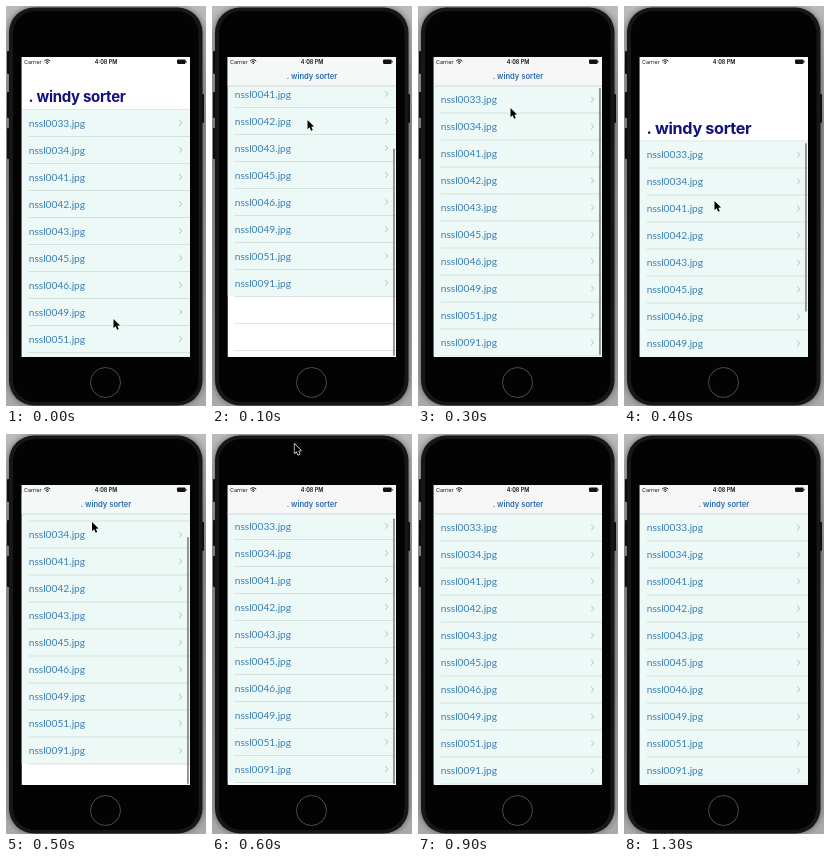
Write an HTML page with a canvas that moves like this. It is 200 by 400 pixels and loops after 1.4 s.

```html
<!DOCTYPE html>
<html lang="en">
<head>
<meta charset="utf-8">
<title>Phone list</title>
<style>
  html, body { margin: 0; width: 100%; height: 100%; overflow: hidden; background: #aaa; }
  canvas { display: block; width: 200px; height: 400px; }
</style>
</head>
<body>
<canvas id="stage"></canvas>
<script>
const canvas = document.getElementById('stage');
const ctx = canvas.getContext('2d');
const dpr = window.devicePixelRatio || 1;
canvas.width = 200 * dpr;
canvas.height = 400 * dpr;

const STEP = 100, STEPS = 14;
const SCREEN = { x: 15.5, y: 51, w: 168.5, h: 300 };
const BOTTOM = SCREEN.y + SCREEN.h;
const NAV = 80, LARGE = 103.5, ROW = 27;
const TITLE = '. windy sorter';
const FILES = [33, 34, 41, 42, 43, 45, 46, 49, 51, 91]
  .map(n => `nssl${String(n).padStart(4, '0')}.jpg`);

// list top, scroll bar opacity, pointer x and y
const POSES = [
  [103.5, 0, 107.5, 313],
  [20.5, 1, 95.5, 114],
  [58, 1, 93.5, 103],
  [80, 1, 92.5, 102],
  [135, 1, 90.5, 195],
  [60, 1, 86, 88],
  [78.5, 1, 82.5, 10],
  [79.6, 0.8],
  [80, 0.3]
];
const REST = [80, 0];

function box(x, y, w, h, r, fill) {
  ctx.beginPath();
  ctx.roundRect(x, y, w, h, r);
  ctx.fillStyle = fill;
  ctx.fill();
}

function line(x1, y1, x2, y2, color, width = 0.6) {
  ctx.beginPath();
  ctx.moveTo(x1, y1);
  ctx.lineTo(x2, y2);
  ctx.strokeStyle = color;
  ctx.lineWidth = width;
  ctx.stroke();
}

function text(str, x, y, font, color, align = 'left', spacing = 0) {
  ctx.font = font;
  ctx.fillStyle = color;
  ctx.textAlign = align;
  ctx.letterSpacing = spacing + 'px';
  ctx.fillText(str, x, y);
}

function drawPhone() {
  const bg = ctx.createLinearGradient(0, 0, 0, 400);
  bg.addColorStop(0, '#bcbcbc');
  bg.addColorStop(0.3, '#969696');
  bg.addColorStop(1, '#aaaaaa');
  ctx.fillStyle = bg;
  ctx.fillRect(0, 0, 200, 400);

  box(1, 45, 4, 23, 1, '#111');
  box(1, 86, 4, 26, 1, '#111');
  box(1, 122, 4, 31, 1, '#111');
  box(194, 88, 4, 29, 1, '#111');

  ctx.save();
  ctx.shadowColor = 'rgba(0,0,0,.5)';
  ctx.shadowBlur = 6 * dpr;
  box(3, 1.5, 193.5, 398, 25, '#171717');
  ctx.restore();
  box(7, 5, 185.5, 391, 22, '#030303');

  ctx.beginPath();
  ctx.arc(99.5, 376.5, 15, 0, Math.PI * 2);
  ctx.strokeStyle = '#4c4c4c';
  ctx.lineWidth = 1;
  ctx.stroke();
}

function drawRows(top) {
  const end = top + FILES.length * ROW;
  ctx.fillStyle = '#edf9f6';
  ctx.fillRect(SCREEN.x, top, SCREEN.w, end - top);

  FILES.forEach((name, i) => {
    const y = top + i * ROW + 13.5;
    text(name, 22.7, y + 3.5, '10.2px Lato, sans-serif', '#397fb6');
    ctx.beginPath();
    ctx.moveTo(173.2, y - 2.6);
    ctx.lineTo(175.9, y);
    ctx.lineTo(173.2, y + 2.6);
    ctx.strokeStyle = '#b2bdbb';
    ctx.lineWidth = 1;
    ctx.stroke();
  });

  for (let y = top + ROW; y < BOTTOM; y += ROW) {
    line(22.5, y, 184, y, y > end ? '#d3d3d3' : '#c6d2cf');
  }
}

function drawHeader(top) {
  const compact = top <= NAV;
  const bottom = Math.max(top, NAV);
  ctx.fillStyle = !compact ? '#fff' : top < 70 ? '#f4f8f7' : '#f6f6f6';
  ctx.fillRect(SCREEN.x, SCREEN.y, SCREEN.w, bottom - SCREEN.y);
  line(SCREEN.x, bottom, 184, bottom, compact ? '#bdc1c0' : '#ccd7d4');

  if (compact) {
    text(TITLE, 100, 72.8, '600 7.6px Inter, sans-serif', '#2a6db4', 'center');
  } else {
    const grow = 1 + Math.max(0, top - LARGE) * 0.0025;
    ctx.save();
    ctx.translate(22.5, top - 7.5);
    ctx.scale(grow, grow);
    text(TITLE, 0, 0, '700 15px Inter, sans-serif', '#11117c', 'left', -0.3);
    ctx.restore();
  }
}

function drawStatus() {
  text('Carrier', 18, 57.8, '5.4px Inter, sans-serif', '#111');
  text('4:08 PM', 100, 57.8, '600 5.5px Inter, sans-serif', '#111', 'center');

  ctx.strokeStyle = '#111';
  ctx.lineWidth = 1;
  for (const r of [2.3, 4.2]) {
    ctx.beginPath();
    ctx.arc(41.2, 58, r, -Math.PI * 0.76, -Math.PI * 0.24);
    ctx.stroke();
  }
  box(40.5, 56.7, 1.4, 1.4, 0.7, '#111');

  box(171, 53.5, 8.7, 4.4, 1.1, '#111');
  box(180.1, 55, 0.7, 1.5, 0.3, '#111');
}

function drawScrollBar(top, alpha) {
  if (!alpha) return;
  const head = Math.max(top, NAV);
  const view = BOTTOM - head;
  const over = Math.max(0, NAV - top);
  const size = Math.min(267, view * view / (FILES.length * ROW) - 4) - over;
  const y = over ? BOTTOM - 1 - size : head + 2;
  ctx.globalAlpha = alpha;
  box(181.2, y, 1.5, size, 0.75, '#737876');
  ctx.globalAlpha = 1;
}

function drawPointer(x, y) {
  ctx.save();
  ctx.translate(x, y);
  ctx.beginPath();
  ctx.moveTo(0, 0);
  ctx.lineTo(0, 9.2);
  ctx.lineTo(2.1, 7.3);
  ctx.lineTo(3.6, 10.8);
  ctx.lineTo(5.3, 10);
  ctx.lineTo(3.8, 6.7);
  ctx.lineTo(6.6, 6.6);
  ctx.closePath();
  ctx.lineJoin = 'round';
  ctx.lineWidth = 1.3;
  ctx.strokeStyle = '#fff';
  ctx.stroke();
  ctx.fillStyle = '#000';
  ctx.fill();
  ctx.restore();
}

function draw(now) {
  const step = Math.floor(now / STEP) % STEPS;
  const [top, bar, px, py] = POSES[step] || REST;

  ctx.setTransform(dpr, 0, 0, dpr, 0, 0);
  drawPhone();

  ctx.save();
  ctx.beginPath();
  ctx.rect(SCREEN.x, SCREEN.y, SCREEN.w, SCREEN.h);
  ctx.clip();
  ctx.fillStyle = '#fff';
  ctx.fillRect(SCREEN.x, SCREEN.y, SCREEN.w, SCREEN.h);
  drawRows(top);
  drawHeader(top);
  drawStatus();
  drawScrollBar(top, bar);
  ctx.restore();

  if (px !== undefined) drawPointer(px, py);
}

const start = performance.now();
function tick() {
  draw(performance.now() - start);
  requestAnimationFrame(tick);
}
tick();
</script>
</body>
</html>
```
